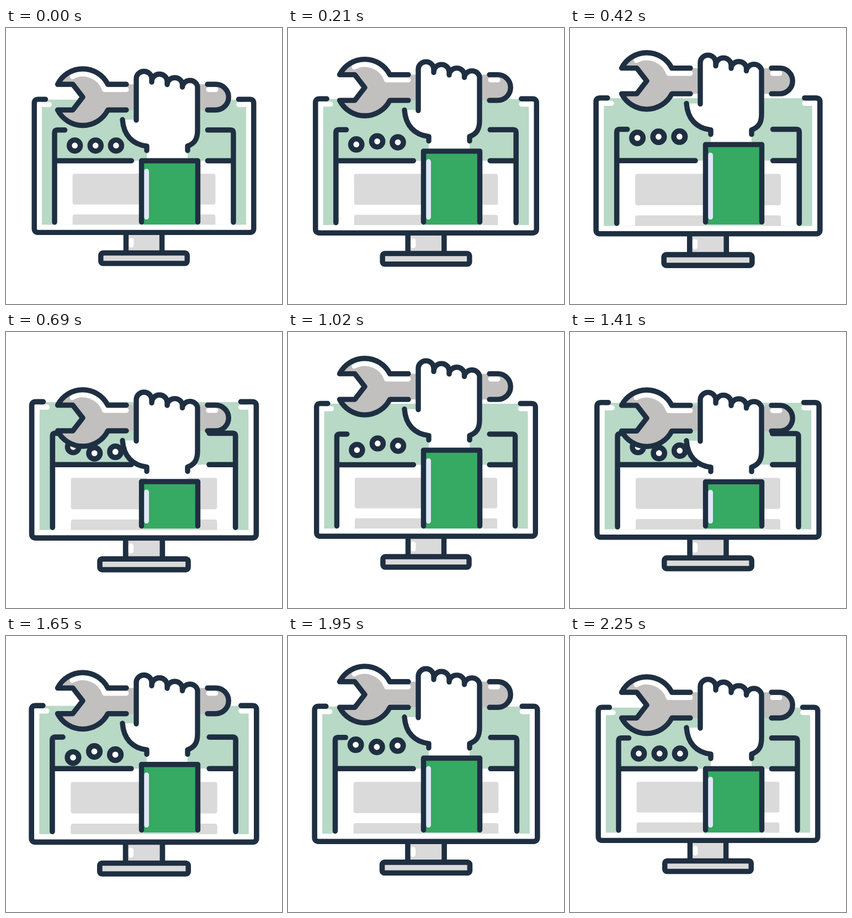
An HTML page for the animation above (2280 ms loop, 500 px wide and 500 px high).

```html
<!DOCTYPE html>
<html lang="en">
<head>
<meta charset="utf-8">
<title>Site repair</title>
<style>
  html, body { margin: 0; width: 100%; height: 100%; overflow: hidden; background: #fff; }
  svg { display: block; width: 100%; height: 100%; }
  .line { fill: none; stroke: #1f2f42; stroke-width: 9.4; stroke-linecap: round; stroke-linejoin: round; }
  .shine { fill: none; stroke: #fff; stroke-width: 9; stroke-linecap: round; stroke-linejoin: round; }
  .mint { fill: #b7d9c6; }
  .pale { fill: #dadada; }
  .steel { fill: #c1c0bf; }
  .white { fill: #fff; }
  .green { fill: #36a962; }
</style>
</head>
<body>
<svg viewBox="0 0 500 500">
  <g id="monitor">
    <path class="white" d="M51.5 130H448.5V370H51.5Z"/>
    <path class="mint" d="M65.5 130H434.5V356H65.5Z"/>
    <path class="white" d="M88.5 240.5H411.5V356H88.5Z"/>
    <path class="shine" d="M61 150V139H79M439 150V139H421"/>
    <rect class="pale" x="121" y="264" width="258" height="55.5" rx="4"/>
    <path class="pale" d="M121 356V341.5Q121 337.5 125 337.5H375Q379 337.5 379 341.5V356Z"/>
    <path class="line" d="M107 185H93Q88.5 185 88.5 189.5V351.5M365 185H407Q411.5 185 411.5 189.5V351.5M88.5 240.5H227.500M365 240.5H411.5"/>
    <path class="pale" d="M217.500 370H282.500V407H217.500Z"/>
    <path class="shine" d="M227 384V393"/>
    <path class="line" d="M217.500 372V405M282.500 372V405"/>
    <rect class="line" style="fill:#dadada" x="172" y="407" width="156" height="19" rx="4"/>
    <path class="line" d="M72 129.500H59Q51.800 129.500 51.800 136.500V363Q51.800 370 59 370H441Q448.200 370 448.200 363V136.500Q448.200 129.500 441 129.500H421"/>
    <g id="dots">
      <circle class="line" style="fill:#fff" cx="125" cy="213" r="10"/>
      <circle class="line" style="fill:#fff" cx="162.500" cy="213" r="10"/>
      <circle class="line" style="fill:#fff" cx="199.500" cy="213" r="10"/>
    </g>
  </g>
  <path id="sleeveFill" class="green"/>
  <path id="sleeveShine" class="shine" style="stroke:#dfe8fb"/>
  <g id="arm">
    <path class="steel" d="M93.500 102A51 51 0 0 1 184.500 102H380A23.200 23.200 0 0 1 380 148.500H184.500A51 51 0 0 1 93.500 148.500H121L139 125.200L121 102Z"/>
    <path class="shine" d="M120 88.200A41.500 41.500 0 0 1 178.500 111.500H218M367 111.500H380"/>
    <path class="line" d="M218 102H184.500A51 51 0 0 0 93.500 102H121L139 125.200L121 148.500H93.500A51 51 0 0 0 184.500 148.500H218M365 102H380A23.200 23.200 0 0 1 380 148.500H365"/>
    <path class="white" d="M211 166H236V92A14 13.500 0 0 1 264 92V97A14 13.500 0 0 1 292 97V101A14 13.500 0 0 1 319.500 101V106A14 13.500 0 0 1 347 106V185C347 201 342 209 329 214V240H255V214C229 211 213 194 211 166Z"/>
    <path class="line" d="M236 167V92A14 13.500 0 0 1 264 92V98V97A14 13.500 0 0 1 292 97V102.500V101A14 13.500 0 0 1 319.500 101V107V106A14 13.500 0 0 1 347 106V185C347 201 342 209 329 214V222M211 166C213 194 229 211 255 214V222"/>
  </g>
  <path id="sleeveLine" class="line"/>
</svg>
<script>
  const LOOP = 2280, STEP = 30;
  const el = id => document.getElementById(id);
  const dots = [...el('dots').children];

  // Each track is a list of [time, value] with smooth easing between entries.
  const zoom = [[0, .1], [600, 1], [1050, 0], [1110, 0], [1700, 1], [2270, .1]];
  const swing = (times, up, down) =>
    times.map((t, i) => [t, i % 6 === 0 ? 0 : i % 2 ? up : down]);
  const lift = swing([0, 388, 720, 1080, 1438, 1798, 2160], -31, 32);
  const hops = [
    [130, 515, 880, 1235, 1605, 1950, 2250],
    [30, 400, 745, 1115, 1475, 1830, 2190],
    [60, 425, 785, 1170, 1535, 1885, 2220]
  ].map(times => swing(times, -15, 9));

  function at(track, t) {
    const n = track.findIndex(k => k[0] > t);
    if (n === 0) return track[0][1];
    if (n < 0) return track[track.length - 1][1];
    const [t0, a] = track[n - 1], [t1, b] = track[n];
    const p = (t - t0) / (t1 - t0);
    return a + (b - a) * p * p * (3 - 2 * p);
  }

  function draw(t) {
    const s = 1 + .029 * at(zoom, t);
    el('monitor').setAttribute('transform', `translate(250 250) scale(${s}) translate(-250 -250)`);
    dots.forEach((dot, i) => dot.setAttribute('cy', 213 + at(hops[i], t)));

    const y = at(lift, t), top = 240.5 + y;
    el('arm').setAttribute('transform', `translate(0 ${y})`);
    el('sleeveFill').setAttribute('d', `M245.5 356V${top}H347.5V356Z`);
    el('sleeveLine').setAttribute('d', `M245.5 351.5V${top}H347.5V351.5`);
    el('sleeveShine').setAttribute('d', `M254.5 ${top + 19}V342.500`);
  }

  function tick(now) {
    const t = Math.floor(now % LOOP / STEP) * STEP;
    draw(t > STEP ? t : 0);
    requestAnimationFrame(tick);
  }
  draw(0);
  requestAnimationFrame(tick);
</script>
</body>
</html>
```
